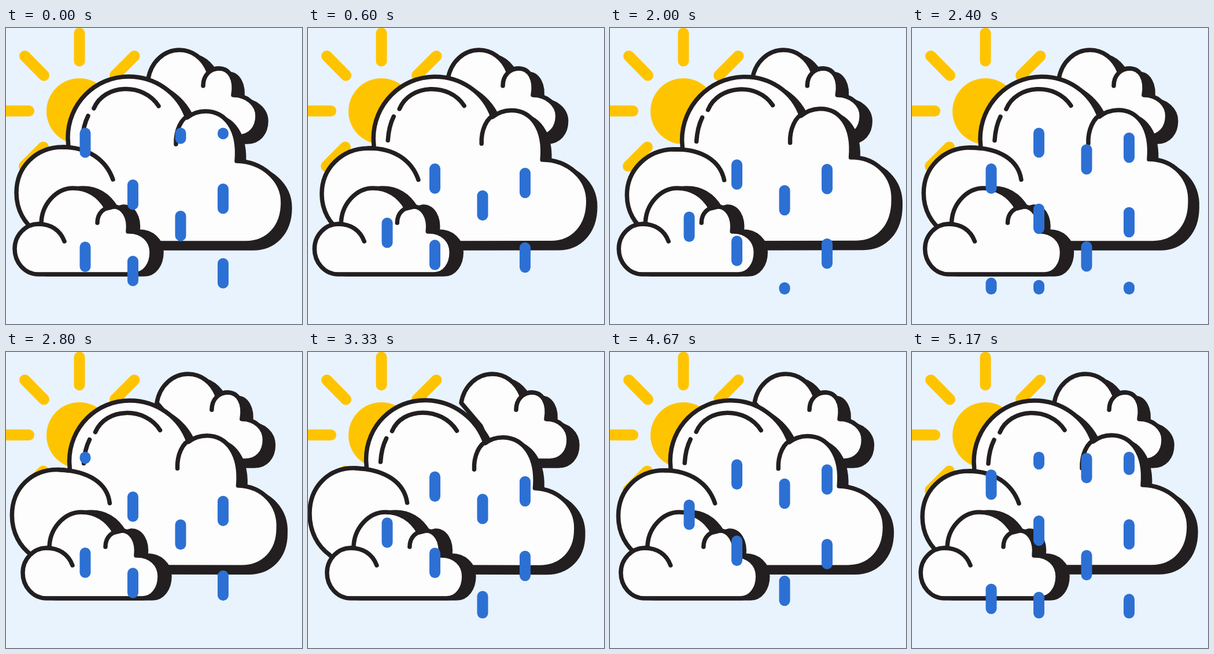
An HTML page with a canvas that plays this animation: 512x512 px, repeating every 5210 ms.

```html
<!DOCTYPE html>
<html lang="en">
<head>
<meta charset="utf-8">
<title>Rain clouds</title>
<style>
  html, body { margin: 0; height: 100%; overflow: hidden; background: #e8f3fe; }
  canvas { display: block; width: 100vw; height: 100vh; }
</style>
</head>
<body>
<canvas width="512" height="512"></canvas>
<script>
const ctx = document.querySelector('canvas').getContext('2d');
const LOOP = 5210, STEP = 40, LAST = 129;
const SKY = '#e8f3fe', SUN = '#ffc400', INK = '#231f20', WHITE = '#fdfdfd', RAIN = '#2d70d3';

const clamp = v => Math.min(1, Math.max(0, v));
const mix = (a, b, p) => a + (b - a) * p;
const ease = p => (1 - Math.cos(Math.PI * clamp(p))) / 2;

// Sway 0 -> high (at t1) -> low (at t2) -> 0 (at 5200 ms)
function sway(t, t1, t2, high, low) {
  if (t < t1) return high * ease(t / t1);
  if (t < t2) return mix(high, low, ease((t - t1) / (t2 - t1)));
  return low * (1 - ease((t - t2) / (5200 - t2)));
}

// Each cloud: outline, inner strokes, offset of its shadow
const back = {
  body: 'M246 88 C251 58 274 38 300 38 C322 38 341 52 350 75 C356 71 362 70 369 70 ' +
        'C386 70 398 88 393 116 C416 116 435 132 435 152 C435 173 422 188 402 188 L310 188 L283 128 Z',
  lines: 'M341 100 C341 82 353 70 369 70',
  shift: 15, drop: 9
};
const main = {
  body: 'M75 372 L52 352 C32 338 18 315 18 285 C18 240 52 206 98 206 L108 206 L107 190 ' +
        'C107 131 154 84 212 84 C258 84 298 112 313 155 C322 148 333 144 345 144 ' +
        'C379 144 404 175 399 230 C443 231 479 262 479 302 C479 345 452 372 415 372 Z',
  lines: 'M98 206 C142 206 173 228 185 262 M294 201 C293 178 303 155 318 151 ' +
         'M152 139 C170 96 238 94 264 135 M142 152 C136 164 133 177 132 193',
  shift: 12, drop: 9
};
const front = {
  body: 'M56 426 C32 426 15 405 15 382 C15 358 34 339 56 339 L61 339 C61 305 87 277 116 277 ' +
        'C142 277 161 290 174 312 L186 309 C202 309 214 326 211 352 C236 351 252 368 252 388 ' +
        'C252 409 240 426 222 426 Z',
  lines: 'M56 339 C78 339 94 350 101 369 M158 337 C158 320 170 309 186 309',
  shift: 17, drop: 0
};

// Build a path with every point moved by warp(x, y)
function bend(d, warp) {
  return new Path2D(d.replace(/(\d+) (\d+)/g, (_, x, y) => warp(+x, +y).join(' ')));
}

function paint(path, fill) {
  ctx.fillStyle = fill;
  ctx.fill(path);
  ctx.stroke(path);
}

function cloud({ body, lines, shift, drop }, warp) {
  const outline = bend(body, warp);
  ctx.strokeStyle = INK;
  ctx.lineWidth = 7.5;
  ctx.save();
  ctx.translate(shift, drop);
  paint(outline, INK);
  ctx.restore();
  paint(outline, WHITE);
  ctx.stroke(bend(lines, warp));
}

function line(x1, y1, x2, y2) {
  ctx.beginPath();
  ctx.moveTo(x1, y1);
  ctx.lineTo(x2, y2);
  ctx.stroke();
}

function sun() {
  ctx.fillStyle = ctx.strokeStyle = SUN;
  ctx.lineWidth = 19;
  ctx.beginPath();
  ctx.arc(127, 144, 57, 0, 7);
  ctx.fill();
  line(127, 9, 127, 57);
  line(-10, 143.5, 39.5, 143.5);
  line(32.5, 48.5, 65.5, 82);
  line(222, 48.5, 188.5, 82);
  line(31.5, 239, 64.5, 206);
}

// Column x, first drop top, distance between drops
const columns = [[137, 172, 197.5], [219.5, 262, 132], [302, 148, 168], [375.5, 269, 129]];

function rain(frame) {
  ctx.strokeStyle = RAIN;
  ctx.lineWidth = 19;
  for (const [x, start, gap] of columns) {
    const first = start + gap * (frame % 18) / 19;
    for (let n = -3; n < 3; n++) {
      const top = first + n * gap;
      const a = Math.max(top + 9.5, 182), b = Math.min(top + 43, 451.5);
      if (b > a) line(x, a, x, b);
    }
  }
}

function draw(now) {
  const frame = Math.min(LAST, Math.floor(now % LOOP / STEP));
  const t = frame * STEP;
  const low = sway(t, 1480, 3450, 16.5, -15.5);
  const high = sway(t, 1600, 3720, 20, -9);
  const tilt = sway(t, 1600, 3720, 1, -0.9);
  const side = sway(t, 1200, 3350, -8, 19);

  ctx.lineCap = ctx.lineJoin = 'round';
  ctx.fillStyle = SKY;
  ctx.fillRect(0, 0, 512, 512);
  sun();
  cloud(back, (x, y) => [x + side * (y > 120 ? 0.84 : 1), y]);
  cloud(main, (x, y) => {
    const upper = x > 105 ? clamp((270 - y) / 40) : 0;
    const lift = mix(low / 16, tilt, upper) * clamp((384 - y) / 150);
    return [x + mix(low, high, upper), y - (x - 225) * 0.042 * lift];
  });
  cloud(front, (x, y) => [x + side * 0.94, y]);
  rain(frame);
}

const begin = performance.now();
function tick() {
  draw(performance.now() - begin);
  requestAnimationFrame(tick);
}
tick();
</script>
</body>
</html>
```
